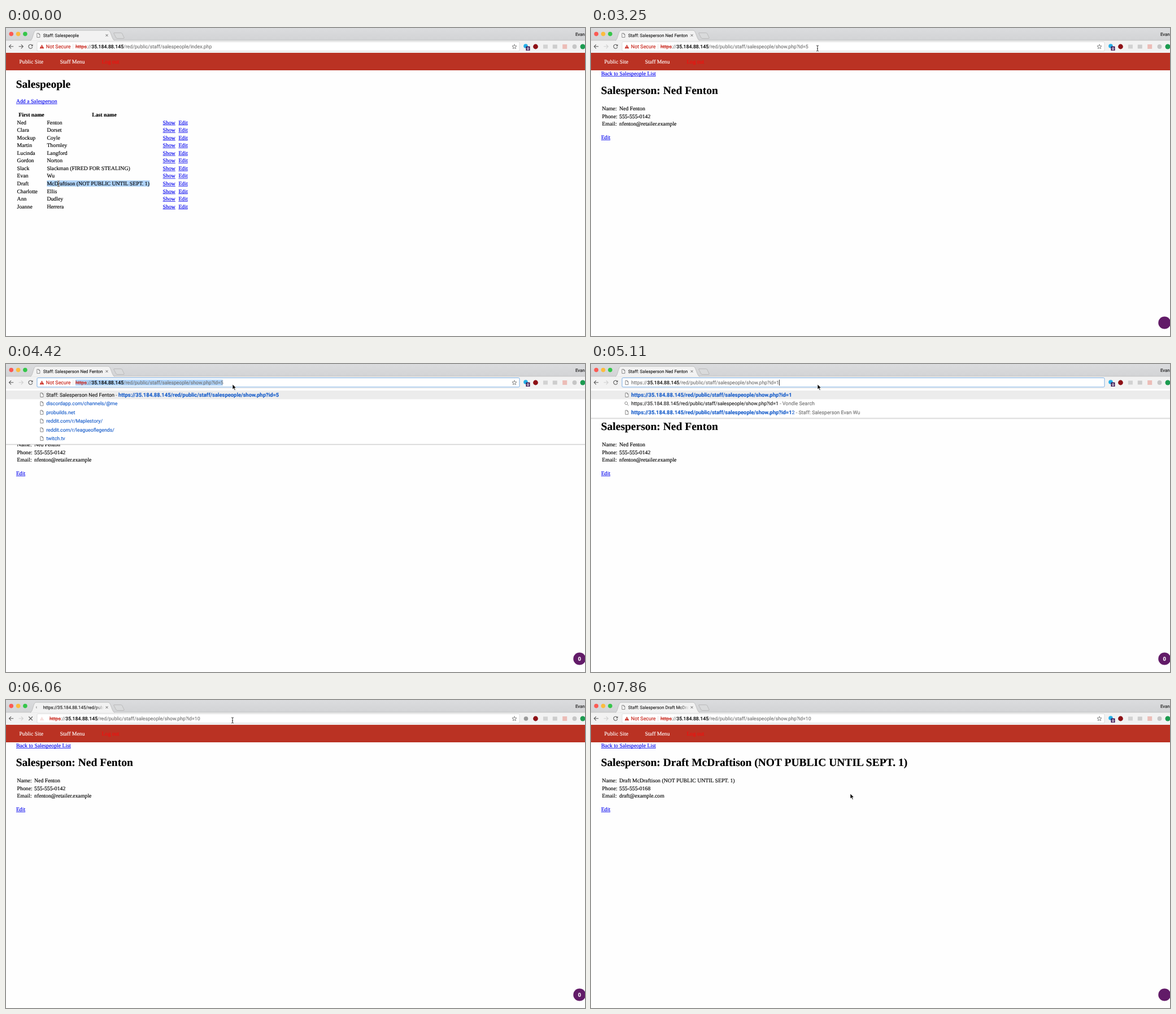
Recreate the animation shown at these times as an HTML page with a canvas. Size 1025 px wide and 546 px high, loop 8 s.

```html
<!DOCTYPE html>
<html lang="en">
<head>
<meta charset="utf-8">
<title>Staff pages</title>
<style>
  html, body { margin: 0; width: 100%; height: 100%; overflow: hidden; background: #fff; }
  canvas { display: block; width: 1025px; height: 546px; }
</style>
</head>
<body>
<canvas id="stage"></canvas>
<script>
const W = 1025, H = 546, LOOP = 8000;
const canvas = document.getElementById('stage');
const ctx = canvas.getContext('2d');
const dpr = window.devicePixelRatio || 1;
canvas.width = W * dpr;
canvas.height = H * dpr;

const SERIF = '"Liberation Serif", serif', SANS = 'Roboto, sans-serif';
const BODY = `9.77px ${SERIF}`, BOLD = `bold 9.77px ${SERIF}`, H1 = `bold 19.52px ${SERIF}`;
const UI = `8.72px ${SANS}`, UI_HOST = `500 8.72px ${SANS}`, UI_BOLD = `bold 9.43px ${SANS}`;
const UI_NOTE = `8.95px ${SANS}`, TAB = `7.82px ${SANS}`;
const LINK = '#0000ee', BLUE = '#1a5fcb', RED = '#c8261c', GRAY = '#757575', SELECT = '#b0d4fa';

const HOST = '35.184.88.145', DIR = '/red/public/staff/salespeople/';
const SECRET = '(NOT PUBLIC UNTIL SEPT. 1)';
const PEOPLE = [
  'Ned|Fenton', 'Clara|Dorset', 'Mockup|Coyle', 'Martin|Thornley', 'Lucinda|Langford',
  'Gordon|Norton', 'Slack|Slackman (FIRED FOR STEALING)', 'Evan|Wu',
  'Draft|McDraftison ' + SECRET, 'Charlotte|Ellis', 'Ann|Dudley', 'Joanne|Herrera'
].map(p => p.split('|'));
const NED = { name: 'Ned Fenton', phone: '555-555-0142', mail: 'nfenton@retailer.example' };
const DRAFT = { name: 'Draft McDraftison ' + SECRET, phone: '555-555-0168', mail: 'draft@example.com' };

// Pointer: start time, shape, x, y
const POINTER = [
  [0, beam, 93, 276], [570, arrow, 167, 224.5], [930, arrow, 205, 210], [1140, arrow, 240, 194],
  [1350, arrow, 268, 180], [1550, hand, 283, 173], [1760, hand, 283, 172],
  [2300, arrow, 190, 166], [2560, beam, 44, 161.5], [2890, arrow, 390.5, 64.5],
  [3250, beam, 401, 36], [4000, arrow, 401, 36], [6060, beam, 401, 36],
  [6830, arrow, 290, 92], [7036, beam, 160, 139], [7242, beam, 108, 144],
  [7448, beam, 190, 146], [7654, arrow, 340, 158], [7860, arrow, 459, 166]
];

// A hairline stroke gives the slightly heavy look of smoothed desktop text.
function text(s, x, y, font = BODY, color = '#000') {
  ctx.font = font;
  ctx.fillStyle = ctx.strokeStyle = color;
  ctx.lineWidth = 0.16;
  ctx.fillText(s, x, y);
  ctx.strokeText(s, x, y);
  return ctx.measureText(s).width;
}

function runs(x, y, parts) {
  for (const [s, color, font = UI] of parts) x += text(s, x, y, font, color);
  return x;
}

function link(s, x, y) {
  const w = text(s, x, y, BODY, LINK);
  ctx.fillRect(x, y + 1, w, 0.8);
}

function centered(s, x, y, font, color) {
  ctx.textAlign = 'center';
  text(s, x, y, font, color);
  ctx.textAlign = 'left';
}

function rect(x, y, w, h, color) {
  ctx.fillStyle = color;
  ctx.fillRect(x, y, w, h);
}

function disc(x, y, r, color) {
  ctx.fillStyle = color;
  ctx.beginPath();
  ctx.arc(x, y, r, 0, 7);
  ctx.fill();
}

function shape(d, x, y, fill, stroke, width = 1) {
  const p = new Path2D(d);
  ctx.save();
  ctx.translate(x, y);
  if (fill) { ctx.fillStyle = fill; ctx.fill(p); }
  if (stroke) { ctx.strokeStyle = stroke; ctx.lineWidth = width; ctx.stroke(p); }
  ctx.restore();
}

function beam(x, y) {
  const d = 'M-2 -5Q0 -5 0 -3.6V3.6Q0 5 -2 5M2 -5Q0 -5 0 -3.6M0 3.6Q0 5 2 5M-1 .8H1';
  shape(d, x, y, null, '#fff', 2);
  shape(d, x, y, null, '#222', 0.9);
}

function arrow(x, y) {
  shape('M0 0V9L2.1 7.1L3.7 10.6L5.2 10L3.7 6.6H6.6Z', x, y, '#000', '#fff', 0.7);
}

function hand(x, y) {
  shape('M-1.8 -4.3Q-.8 -5 -.3 -4L.5 -1.3Q1.6 -2 2.2 -1Q3.2 -1.5 3.7 -.5Q4.7 -.6 4.7 .8'
    + 'Q4.9 3 3.7 5.6H-.5Q-1.4 3.9 -3.8 1.7Q-3.9 .2 -2.2 .8L-1 1.6Z', x, y, '#fff', '#111', 0.9);
}

function pageIcon(x, y, color = '#6b6b6b') {
  shape('M-2.4 -3.6H.7L2.6 -1.6V3.6H-2.4ZM.7 -3.6V-1.6H2.6', x, y, '#fff', color, 0.8);
}

function warning(x, y, alpha) {
  ctx.globalAlpha = alpha;
  shape('M0 -3.5L3.9 3.3H-3.9Z', x, y, RED);
  rect(x - 0.4, y - 1.2, 0.8, 2.4, '#fff');
  rect(x - 0.4, y + 1.7, 0.8, 0.8, '#fff');
  ctx.globalAlpha = 1;
}

function nav() {
  rect(0, 44, W, 31, '#ba3223');
  text('Public Site', 23.4, 63.4, BODY, '#fff');
  text('Staff Menu', 95.6, 63.4, BODY, '#fff');
  text('Log out', 169.6, 63.4, BODY, '#f80d0d');
}

function listPage(selected) {
  text('Salespeople', 17.7, 106, H1);
  link('Add a Salesperson', 17.9, 133);
  centered('First name', 45, 157, BOLD);
  centered('Last name', 174, 157, BOLD);
  PEOPLE.forEach(([first, last], i) => {
    const y = 170.6 + i * 13.55;
    if (selected && first === 'Draft') {
      ctx.font = BODY;
      rect(72.4, y - 8.8, ctx.measureText(last).width + 0.4, 11, SELECT);
    }
    text(first, 19.6, y);
    text(last, 72.4, y);
    link('Show', 277.6, y);
    link('Edit', 305.4, y);
  });
}

function personPage(p) {
  link('Back to Salespeople List', 17.9, 84);
  text('Salesperson: ' + p.name, 17.7, 117, H1);
  [['Name:', p.name], ['Phone:', p.phone], ['Email:', p.mail]].forEach(([label, value], i) => {
    text(label, 19.6, 146 + i * 13.55);
    text(value, 50, 146 + i * 13.55);
  });
  link('Edit', 17.9, 197);
}

function tabStrip(title, loading, t) {
  const g = ctx.createLinearGradient(0, 0, 0, 22);
  g.addColorStop(0, '#dbdcde');
  g.addColorStop(1, '#d2d3d5');
  rect(0, 0, W, 22, g);
  rect(0, 22, W, 22, '#f2f2f2');
  rect(0, 21.6, W, 0.7, '#b9b9b9');
  ['#fb5a54', '#fcbc3e', '#35c64a'].forEach((c, i) => disc(9.3 + i * 12.3, 10.6, 3.8, c));
  shape('M43 22.4C48 21 48 4.2 53 4.2H181C186 4.2 187 21 192.5 22.4', 0, 0, '#f2f2f2', '#b4b4b4', 0.7);
  shape('M191 8.6H203.5Q205 8.6 205.7 10L209 17Q209.6 18.5 208 18.5H197Q195.5 18.5 194.8 17L191 10Q190.3 8.6 191 8.6Z',
    0, 0, '#d9dadb', '#b3b3b3', 0.8);

  if (loading) {
    const a = -2.3 + Math.floor(t / 240) * 0.7;
    ctx.strokeStyle = '#777';
    ctx.lineWidth = 0.9;
    ctx.beginPath();
    ctx.arc(57.3, 13, 3.6, a, a + 1);
    ctx.stroke();
  } else pageIcon(57.3, 13);

  ctx.save();
  ctx.beginPath();
  ctx.rect(65, 5, 108, 16);
  ctx.clip();
  const fade = ctx.createLinearGradient(157, 0, 173, 0);
  fade.addColorStop(0, '#222');
  fade.addColorStop(1, '#2220');
  ctx.font = TAB;
  text(title, 65.8, 15.6, TAB, ctx.measureText(title).width > 107 ? fade : '#222');
  ctx.restore();
  shape('M-2 -2L2 2M2 -2L-2 2', 178.5, 13, null, '#5c5c5c', 0.9);
  text('Evan', 1008, 13.6, TAB, '#222');
}

function toolbar(s) {
  const dark = '#5a5a5a';
  shape('M4 0H-3.6M-.2 -3.5L-3.7 0L-.2 3.5', 9.2, 32.8, null, dark, 1.1);
  shape('M-4 0H3.6M.2 -3.5L3.7 0L.2 3.5', 26.6, 32.8, null, s.forward ? dark : '#cfcfcf', 1.1);
  if (s.loading) shape('M-3.3 -3.3L3.3 3.3M3.3 -3.3L-3.3 3.3', 43.6, 32.8, null, dark, 1.2);
  else {
    shape('M2.6 -2.4A3.5 3.5 0 1 0 3.4 .9', 43.5, 32.8, null, dark, 1.1);
    shape('M4 -4V-.6H.6Z', 43.5, 32.8, dark);
  }

  ctx.beginPath();
  ctx.roundRect(55, 24.5, 854, 16.4, 1.8);
  ctx.fillStyle = '#fff';
  ctx.fill();
  ctx.strokeStyle = s.focus ? '#6ba6e2' : '#d3d3d3';
  ctx.lineWidth = s.focus ? 0.9 : 0.7;
  ctx.stroke();
  address(s);

  if (!s.edited) {
    shape('M0 -4L1.1 -1.3L4 -1.1L1.8 .8L2.5 3.6L0 2.1L-2.5 3.6L-1.8 .8L-4 -1.1L-1.1 -1.3Z',
      900, 33, null, '#666', 0.8);
  }
  if (s.idleExt) disc(920.5, 33, 3.8, '#9a9a9a');
  else {
    disc(920, 32, 3.8, '#25aee6');
    rect(920.5, 32.6, 7, 7.4, '#3b1552');
    centered('0', 924, 38.8, `bold 6.4px ${SANS}`, '#fff');
  }
  disc(937.5, 33, 4.4, '#8e1016');
  rect(951, 29.5, 8, 7, '#d2d2d2');
  rect(967.8, 29.5, 8, 7, '#cdcdcd');
  rect(985.2, 29, 8, 8, '#ecbdb7');
  disc(1006.5, 33, 3.9, '#c6c6c6');
  disc(1021, 33, 4.5, '#1c9b50');
}

function address(s) {
  const path = DIR + s.file, y = 36.1;
  if (s.edited) {
    pageIcon(63.3, 33);
    const end = runs(71.2, y, [['https://', GRAY], [HOST, '#222', UI_HOST], [path, GRAY]]);
    rect(end, 27.8, 0.8, 10.4, '#000');
    return;
  }
  const x = s.arriving ? 77 : 123;
  warning(63.5, 33, s.arriving ? 0.15 : 1);
  if (!s.arriving) {
    text('Not Secure', 70.8, y, `8.92px ${SANS}`, RED);
    rect(118.4, 28, 0.7, 10, '#d8d8d8');
  }
  if (s.selected) {
    ctx.font = UI;
    rect(x, 27.6, ctx.measureText('https://' + HOST + path).width, 10.8, SELECT);
  }
  const end = runs(x, y, [['https', RED], ['://', GRAY], [HOST, '#111', UI_HOST], [path, GRAY]]);
  ctx.font = UI;
  rect(x, 32.8, ctx.measureText('https').width, 0.9, RED);
  if (s.caret) rect(end, 27.8, 0.8, 10.4, '#000');
}

function dropdown(rows) {
  const bottom = 49.9 + rows.length * 15.42;
  rect(0, 44, W, bottom - 44, '#fff');
  rect(0, 47, W, 15.4, '#ececec');
  rect(0, bottom - 0.6, W, 1, '#cdcdcd');
  rect(0, bottom + 0.4, W, 1.2, '#0001');
  rows.forEach((parts, i) => {
    const y = 54.9 + i * 15.42;
    if (parts.search) shape('M1.2 1.2L3.5 3.5M1.7 -.8A2.4 2.4 0 1 1 1.7 -.9Z', 63, y, null, '#6b6b6b', 0.9);
    else pageIcon(63.3, y);
    runs(71.2, y + 3.1, parts);
  });
}

function historyRows() {
  const sites = ['discordapp.com/channels/@me', 'probuilds.net', 'reddit.com/r/Maplestory/',
    'reddit.com/r/leagueoflegends/', 'twitch.tv'];
  const first = [['Staff: Salesperson Ned Fenton', '#222', UI_NOTE], [' - ', GRAY, UI_NOTE],
    ['https://' + HOST + DIR + 'show.php?id=5', BLUE, UI_BOLD]];
  return [first, ...sites.map(u => [[u, BLUE, `8.8px ${SANS}`]])];
}

function typedRows(file) {
  const url = 'https://' + HOST + DIR + file;
  const search = [[url, '#222'], [' - Vondle Search', GRAY, UI_NOTE]];
  search.search = true;
  const rows = [[[url, BLUE, UI_BOLD]], search];
  const rest = { '': '12', '1': '2' }[file.split('=')[1]];
  if (rest) {
    rows.push([[url, BLUE, UI_BOLD], [rest, BLUE, UI_NOTE], [' - Staff: Salesperson Evan Wu', GRAY, UI_NOTE]]);
  }
  return rows;
}

function stateAt(t) {
  const within = (a, b) => t >= a && t < b;
  const last = pairs => pairs.filter(p => p[0] <= t).pop();
  return {
    person: last([[0, null], [2300, NED], [6300, DRAFT]])[1],
    title: last([[0, 'Staff: Salespeople'], [2300, 'Staff: Salesperson Ned Fenton'],
      [6060, 'https://' + HOST + '/red/public/staff'], [6300, 'Staff: Salesperson Draft McDraftison']])[1],
    file: last([[0, 'index.php'], [2300, 'show.php?id=5'], [4870, 'show.php?id='],
      [5110, 'show.php?id=1'], [5550, 'show.php?id=10']])[1],
    loading: within(1970, 2560) || within(6060, 6510),
    idleExt: within(2300, 2560) || within(6060, 6510),
    forward: t < 2300,
    rowSelected: t < 930,
    status: within(1760, 2300),
    focus: within(3790, 6060),
    selected: within(3790, 4630),
    caret: within(4630, 4870),
    edited: within(4870, 6060),
    arriving: within(6060, 6300),
    history: within(4000, 4870),
    typed: within(4870, 6060),
    badge: t >= 2300,
    count: within(3790, 6300),
    pointer: last(POINTER)
  };
}

function draw(t) {
  const s = stateAt(t);
  ctx.setTransform(dpr, 0, 0, dpr, 0, 0);
  ctx.textRendering = 'geometricPrecision';
  rect(0, 0, W, H, '#fefefe');
  nav();
  if (s.person) personPage(s.person);
  else listPage(s.rowSelected);
  tabStrip(s.title, s.loading, t);
  toolbar(s);
  if (s.history) dropdown(historyRows());
  if (s.typed) dropdown(typedRows(s.file));
  if (s.status) {
    ctx.beginPath();
    ctx.roundRect(-2, 542.8, 344.6, 14, 2);
    ctx.fillStyle = '#f3f3f3';
    ctx.fill();
    ctx.strokeStyle = '#a9a9a9';
    ctx.lineWidth = 0.8;
    ctx.stroke();
    text('https://' + HOST + DIR + 'show.php?id=5', 2, 549.6, `7.1px ${SANS}`, '#555');
  }
  if (s.badge) {
    disc(1015.3, 522.5, 11, '#621b68');
    if (s.count) centered('0', 1015.3, 526, `bold 9.6px ${SANS}`, '#fff');
  }
  const [, pointer, x, y] = s.pointer;
  pointer(x, y);
}

const start = performance.now();
function tick() {
  draw((performance.now() - start) % LOOP);
  requestAnimationFrame(tick);
}
tick();
</script>
</body>
</html>
```
